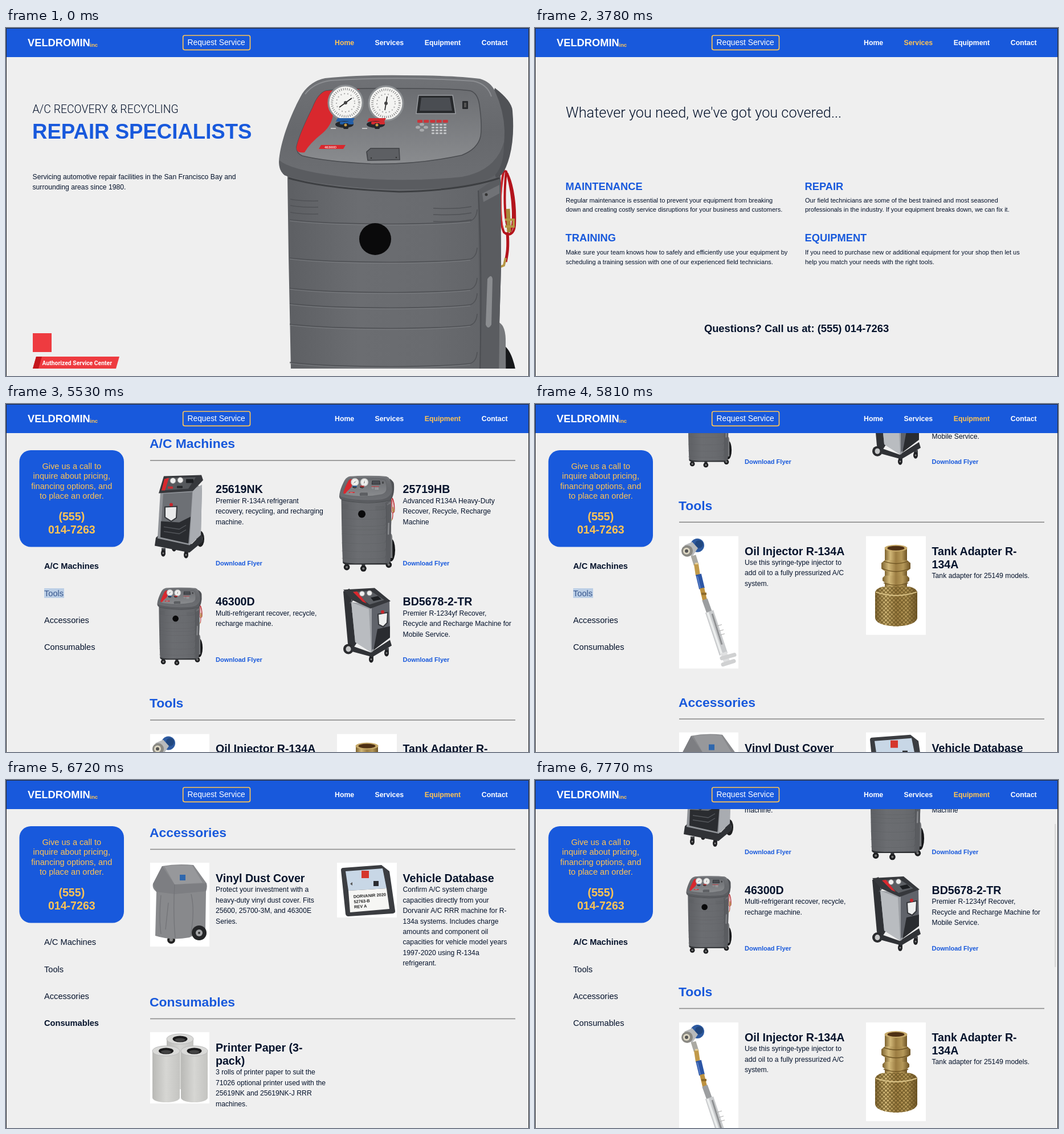
Write an HTML page that moves like this. It is 918 by 610 pixels and loops after 8 s.

```html
<!DOCTYPE html>
<html lang="en">
<head>
<meta charset="utf-8">
<title>Service site tour</title>
<style>
html, body { margin: 0; width: 100%; height: 100%; overflow: hidden; background: #efefef; }
svg { display: block; width: 918px; height: 610px; }
text { font-family: "Liberation Sans", Arial, Helvetica, sans-serif; white-space: pre; }
.b { font-weight: 700; }
.light { font-family: Roboto, "Open Sans", sans-serif; font-weight: 300; }
.tag { font-family: Roboto, Arial, sans-serif; font-weight: 700; }
.mid { text-anchor: middle; }
</style>
</head>
<body>
<svg id="stage" viewBox="0 0 918 610"></svg>
<script>
const BLUE = '#1859dc', GOLD = '#ffc454', INK = '#04122b', BG = '#efefef', PHONE = ['(555)', '014-7263'];

const text = (x, y, size, fill, str, cls = '', more = '') =>
  `<text x="${x}" y="${y}" font-size="${size}" fill="${fill}" class="${cls}" ${more}>${str}</text>`;
const lines = (x, y, step, size, fill, list, cls) =>
  list.map((s, i) => text(x, y + i * step, size, fill, s, cls)).join('');
const path = (d, fill, more = '') => `<path d="${d}" fill="${fill}" ${more}/>`;
const line = (d, color, w = 1, more = '') => path(d, 'none', `stroke="${color}" stroke-width="${w}" ${more}`);
const rect = (x, y, w, h, fill, r = 0, more = '') =>
  `<rect x="${x}" y="${y}" width="${w}" height="${h}" rx="${r}" fill="${fill}" ${more}/>`;
const oval = (x, y, rx, ry, fill, more = '') =>
  `<ellipse cx="${x}" cy="${y}" rx="${rx}" ry="${ry}" fill="${fill}" ${more}/>`;
const dot = (x, y, r, fill, more) => oval(x, y, r, r, fill, more);
const group = (id, body, more = '') => `<g id="${id}" ${more}>${body}</g>`;
const grad = (id, dir, stops) => `<linearGradient id="${id}" ${dir === 'v' ? 'x2="0" y2="1"' : ''}>` +
  stops.map((c, i) => `<stop offset="${i / (stops.length - 1)}" stop-color="${c}"/>`).join('') + '</linearGradient>';

function gauge(x, y, nx, ny) {
  return dot(x, y, 30, '#f4f4f2', 'stroke="#8d9093" stroke-width="3"') +
    dot(x, y, 24, 'none', 'stroke="#777" stroke-width="4" stroke-dasharray="1 2.6"') +
    dot(x, y, 16, 'none', 'stroke="#aaa" stroke-width="2" stroke-dasharray="2 4"') +
    line(`M${x - nx} ${y - ny}L${x + nx} ${y + ny}`, '#222', 1.6) + dot(x, y, 3, '#444');
}

function valve(x, y, color) {
  return path(`M${x - 12} ${y - 11}h30l-3 6h-30z`, color) +
    oval(x, y, 16, 6, '#23272c') + rect(x - 8, y - 5, 24, 5, color, 2) +
    rect(x - 2, y - 2, 9, 10, '#22252a', 2) + dot(x + 2, y + 1, 2.5, '#c59a46') +
    line(`M${x - 24} ${y + 7}h9`, '#ddd', 1.5);
}

function bigUnit() {
  const ridge = [340, 407, 460, 487, 523, 590, 650, 705].map(y =>
    line(`M498 ${y - 4}C570 ${y + 5} 740 ${y + 6} 815 ${y - 2}Q826 ${y - 6} 827 ${y - 22}`, '#505256', 1.6) +
    line(`M498 ${y - 2}C570 ${y + 7} 740 ${y + 8} 815 ${y}`, '#818387', .8)).join('');
  const ribs = [303, 314, 326].map(y =>
    line(`M499 ${y - 3}Q520 ${y + 1} 548 ${y}M750 ${y + 13}Q790 ${y + 15} 817 ${y + 10}`, '#505256', 1.5)).join('');
  let keys = '';
  for (let i = 0; i < 16; i++) keys += rect(747 + i % 4 * 7, 168 + (i >> 2) * 5, 5, 3, '#bfc1c3', 1);
  for (let i = 0; i < 5; i++) keys += rect(722 + i * 11.2, 161, 9, 5, '#c9353a', 1);
  for (const [x, y] of [[723, 174], [737, 174], [730, 169], [730, 179]]) keys += oval(x, y, 4, 2.6, '#a9abad');
  const caster = (x, y) => rect(x - 13, y - 38, 26, 26, '#3a3c3f', 3) +
    dot(x, y, 23, '#1d1e20') + dot(x, y, 9, '#777');
  return caster(535, 768) + caster(660, 778) + caster(850, 750) +
    oval(868, 640, 30, 85, '#17181a') + oval(862, 640, 15, 45, '#66686b') +
    path('M862 515Q876 518 877 545L878 700H860z', '#77797c') +
    // hose and fittings
    line('M874 248C865 290 866 340 874 358C882 365 892 362 893 346C895 300 886 262 876 250M880 255C892 300 893 350 884 358M878 250C873 300 876 340 882 352', '#b3141c', 4) +
    line('M871 252C868 300 869 330 872 352', '#e0393d', 1.3) +
    line('M880 358C882 385 880 395 877 410', '#b3141c', 5) +
    line('M881 317L883 358', '#a8893b', 7) + line('M876 336h15v12h-15M877 403l-3 13l-7 3', '#b59645', 4) +
    // cabinet
    path('M494 258L496 400L500 597L505 735Q508 744 530 747L840 747Q862 740 864 700L866 520L869 420L868 255z', 'url(#front)') +
    path('M828 285L868 258L869 420L866 520L864 700Q862 740 835 747z', '#5a5c60') +
    path('M836 290L866 275L866 290L838 305z', '#707276') +
    path('M845 440Q852 430 854 440L852 520Q846 530 842 520z', '#8b8d90') +
    line('M829 285Q836 420 832 600L828 742', '#4b4d51', 2) + dot(843, 292, 2.5, '#333') + ridge + ribs +
    path('M505 725Q520 738 600 740L840 738L838 749L530 749Q507 746 505 725z', '#2d2f32') +
    // hood
    path('M858 105Q888 128 889 145Q893 190 884 225Q874 262 860 262L835 200z', '#505256') +
    path('M479 235C481 200 500 150 520 115Q535 93 560 88Q620 82 700 83Q790 83 832 89Q850 94 858 110Q874 145 875 180Q875 230 858 258Q842 272 790 279Q690 288 600 278Q520 270 489 258Q479 250 479 235z', 'url(#hood)') +
    path('M480 232Q500 250 600 262Q700 271 800 261Q860 250 874 200Q875 240 858 258Q842 272 790 279Q690 288 600 278Q520 270 489 258Q478 249 480 232z', '#5a5c60') +
    line('M525 116Q540 96 570 92Q690 84 820 93Q845 98 852 120', '#8c8e92', 2) +
    line('M496 263Q560 282 690 287Q800 285 866 263', '#3d3f42', 3) +
    path('M510 208Q515 186 538 140Q548 114 562 110Q600 105 700 106Q790 106 815 110Q828 114 831 135Q836 170 833 190Q828 212 800 223Q720 240 640 238Q560 234 520 224Q509 219 510 208z', 'url(#panel)', 'stroke="#4a4c50" stroke-width="1.5"') +
    path('M510 208Q515 186 538 140Q548 114 562 110L622 107Q582 118 574 148Q574 168 556 184Q533 202 524 218Q508 220 510 208z', '#d9282e') +
    gauge(596, 131, -11, 8) + gauge(667, 132, -2, 12) +
    valve(594, 169, '#245fa8') + valve(649, 169, '#d22b30') +
    path('M724 118H784L789 150H720z', '#27292c', 'stroke="#999ca0" stroke-width="1.5"') +
    path('M729 122H779L783 145H726z', '#4a4d52') + rect(801, 128, 10, 14, '#292b2e', 1) + rect(804, 131, 4, 8, '#555') +
    keys + path('M553 205H596L592 212H549z', '#d9282e') +
    text(559, 211, 6, '#f4dada', '46300D', 'b') +
    path('M640 211H690L691 231L635 232L633 217z', '#5d5f63', 'stroke="#3c3e42" stroke-width="1.5"') +
    dot(641, 228, 1.2, '#333') + dot(685, 227, 1.2, '#333') +
    dot(648, 370, 28, '#0a0a0b');
}

const casterS = (x, y) => rect(x - 3, y - 9, 7, 7, '#44464a') + oval(x, y, 4, 6, '#202124') + dot(x, y, 1.5, '#888');

function tallUnit() {
  return oval(341, 237, 7, 14, '#1f2022') + oval(342, 237, 3, 6, '#8d8f92') + casterS(276, 262) + casterS(316, 265) + casterS(295, 253) +
    path('M263 235L270 228L326 246L344 228L345 242L322 261L261 249z', '#303236') +
    path('M271 154L334 141L344 148L342 230L322 248L266 236z', '#8f9297') +
    path('M328 150L344 142L342 230L322 248z', '#a9acb1') +
    path('M276 158L327 155L321 244L271 233z', '#6d7075') +
    path('M272 206L304 208L324 198L320 245L271 234z', '#2a2c30') +
    line('M277 216L304 220L316 213M277 224L304 228L316 221', '#55585d', 1.3) +
    path('M279 181L300 180L299 200L290 206L279 199z', '#e9eaeb', 'stroke="#34363a" stroke-width="2"') +
    path('M277 127L343 125L346 134L328 153L268 157z', '#36383c') +
    path('M282 130L333 129L320 149L273 152z', '#55585c') +
    path('M278 132L286 130L279 152L273 152z', '#d9282e') +
    dot(293, 135, 5, '#eee', 'stroke="#888"') + dot(306, 134, 5, '#eee', 'stroke="#888"') +
    rect(316, 132, 13, 7, '#1d1f22', 1) + rect(284, 145, 9, 4, '#c72d32', 1) + rect(300, 144, 10, 4, '#26282b', 1) +
    dot(290, 177, 3, '#c8252b');
}

function mobileUnit() {
  return path('M592 329L603 324L619 414L606 434L600 420z', '#303236') +
    line('M604 350L612 340M607 366L614 358M610 383L617 375', '#55585d', 2) +
    dot(601, 430, 9, '#2a2b2e') + oval(601, 430, 4.5, 5, '#c7c8c9') + casterS(641, 448) + casterS(668, 437) +
    path('M606 424L640 436L674 414L677 424L643 444L606 434z', '#303236') +
    path('M606 348L650 352L672 344L674 402L642 436L613 418z', '#9da0a5') +
    path('M606 348L637 360L641 436L613 418z', '#b9bcc0') +
    path('M642 354L673 344L674 402L656 420L642 432z', '#60636a') +
    path('M652 395L674 390L674 410L645 432z', '#2a2c30') +
    path('M653 369L670 366L669 384L662 391L654 387z', '#eeefef', 'stroke="#34363a" stroke-width="2"') +
    path('M592 326L647 323L675 346L640 359L607 344z', '#36383c') +
    path('M609 330L640 328L664 344L638 352z', '#5b5e63') +
    path('M609 330L616 329L633 350L626 347z', '#d9282e') +
    dot(625, 333, 4.5, '#eee', 'stroke="#888"') + dot(638, 332, 4.5, '#eee', 'stroke="#888"') +
    path('M640 340L653 337L659 343L645 346z', '#1d1f22') + dot(661, 365, 3, '#c8252b');
}

function injector() {
  return rect(253, 136, 104, 232, '#fff') + dot(285, 152, 12, '#2d5aa0') + dot(288, 150, 7, '#21477f') +
    path('M262 152L276 146L286 157L275 173z', '#b8babb') + dot(267, 162, 10, '#8a8983') + dot(266, 162, 6, '#ded8c4') + dot(266, 162, 3, '#555') +
    line('M278 170L283 186', '#aaa9a2', 9) + line('M283 185L286 205', '#c19a4a', 8) + line('M281 184L286 184', '#e8d19a', 3) +
    line('M287 203L293 228', '#2c56a6', 10) + line('M285 206L290 227', '#5b80c8', 2) +
    line('M293 227L298 248', '#bd923f', 8) + line('M292 237h9', '#8d6a2a', 4) +
    line('M298 247L307 272', '#9c9ea0', 10) + line('M306 268L331 343', '#c9cbcd', 15) +
    line('M303 270L328 344', '#eceeee', 4) + line('M311 272L328 326', '#8f9193', 3) +
    line('M321 303l10 -3M323 310l10 -3M318 294l10 -3', '#aaa', 1) +
    line('M331 340L337 357', '#dfe0e1', 11) + line('M328 350L350 344M330 361L349 355', '#d0d1d2', 7, 'stroke-linecap="round"');
}

function adapter() {
  return rect(581, 136, 105, 173, '#fff') +
    rect(614, 156, 39, 76, 'url(#brass)') + path('M614 178L608 183V193L614 197H653L659 193V183L653 178z', 'url(#brass)') +
    path('M614 205L610 209V214L615 218H652L657 214V209L653 205z', 'url(#brass)') +
    line('M610 193Q634 203 657 193M612 180Q634 188 655 180M612 218Q634 226 655 218', '#6f5523', 1.5) +
    oval(633.5, 157, 20, 6, '#c7aa6a') + oval(633.5, 157, 15, 4, '#4e3014') +
    path('M597 234Q600 225 616 224H652Q668 225 671 234V280Q666 293 634 294Q601 293 597 280z', 'url(#brass)') +
    path('M597 234Q600 225 616 224H652Q668 225 671 234V280Q666 293 634 294Q601 293 597 280z', 'url(#knurl)') +
    line('M598 234Q634 246 670 234', '#d9c286', 2);
}

function cover() {
  return rect(253, 145, 104, 147, '#fff') + dot(290, 280, 7, '#222') + dot(290, 280, 3, '#888') +
    path('M274 151Q300 146 329 149L352 181Q354 188 351 195L350 262L322 276Q290 282 262 273L264 196Q256 190 258 182z', '#88898c') +
    path('M274 151L296 183L352 181L351 195L296 200L264 196L258 182z', '#7d7e82') +
    path('M278 151Q300 148 327 150L345 180L296 183z', '#97989b') +
    line('M296 183Q293 230 297 277M272 202Q268 240 272 270M325 200Q332 230 324 272M285 215L280 262', '#737478', 1.3) +
    dot(339, 268, 13, '#252628') + dot(339, 268, 6, '#a4a5a7') + dot(339, 268, 2, '#333') + rect(305, 166, 10, 10, '#2f67ad');
}

function card() {
  return rect(581, 145, 105, 96, '#fff') +
    path('M588 158Q588 154 592 154L659 149L673 160L683 229Q684 233 679 234L601 239Q597 239 596 235z', '#3b3d41') +
    path('M596 160L661 155L668 190L601 194z', '#c8d7e6') + path('M601 194L668 190L673 226L604 232z', '#f6f6f4') +
    rect(624, 159, 13, 13, '#d5372c') + rect(645, 177, 9, 9, '#2b2c30') + path('M604 182l4 -3v6z', '#555') +
    `<g transform="rotate(-4 640 206)">` + lines(610, 205, 9, 7.4, '#222', ['DORVANIR 2020', '52763-B', 'REV A'], 'b') + '</g>';
}

function rolls() {
  const roll = (x, y, w, h) => path(`M${x} ${y}V${y + h}A${w / 2} 8 0 0 0 ${x + w} ${y + h}V${y}z`, 'url(#paper)') +
    oval(x + w / 2, y, w / 2, 9, '#d9d9d7', 'stroke="#bbb"') + oval(x + w / 2, y, 13, 5.5, '#1b1b1c') + oval(x + w / 2, y + 1.5, 9, 3, '#444');
  return rect(253, 442, 104, 125, '#fff') + roll(282, 454, 47, 80) + roll(257, 475, 48, 82) + roll(307, 475, 47, 82);
}

function item(x, y, title, desc, linkY) {
  return lines(x, y, 23, 19.6, INK, title, 'b') +
    lines(x, y + 17.3 + (title.length - 1) * 23, 18.4, 12.2, INK, desc) +
    (linkY ? text(x, linkY, 11, BLUE, 'Download Flyer', 'b') : '');
}
const section = (y, name) => text(252, y, 22.9, BLUE, name, 'b') + rect(253, y + 20.7, 641, 1.6, '#8b8b8b');
const shift = (y, body) => `<g transform="translate(0 ${y})">${body}</g>`;

const defs = `<defs>${grad('front', 'h', ['#5d5f63', '#6b6d71', '#696b6f', '#606266'])}
${grad('hood', 'v', ['#707276', '#66686c', '#6e7074'])}${grad('panel', 'v', ['#6b6d71', '#8a8c8f'])}
${grad('brass', 'h', ['#7c6230', '#d2b878', '#9c7d42', '#b59858', '#6e5426'])}${grad('paper', 'h', ['#b9b9b6', '#d6d6d3', '#c4c4c1'])}
<pattern id="knurl" width="7" height="7" patternUnits="userSpaceOnUse">${line('M0 0L7 7M7 0L0 7', '#65501f', 1.1)}</pattern>
<clipPath id="cut"><rect x="470" y="60" width="440" height="537"/></clipPath>${group('unit', bigUnit())}</defs>`;

const home =
  text(46.5, 149, 19.4, INK, 'A/C RECOVERY &amp; RECYCLING', 'light') +
  text(46, 194, 36.6, BLUE, 'REPAIR SPECIALISTS', 'b') +
  lines(46.5, 265, 18.4, 12.2, INK, ['Servicing automotive repair facilities in the San Francisco Bay and', 'surrounding areas since 1980.']) +
  rect(47, 535, 33, 33, '#ee3b40') +
  path('M53 576H199L193 597H47z', '#ee3b40') + path('M53 576H63L57 597H47z', '#c4161c') +
  text(63.5, 591, 10.4, '#fff', 'Authorized Service Center', 'tag') +
  '<g clip-path="url(#cut)"><use href="#unit"/></g>';

const offer = (x, y, gap, name, body) => text(x - .4, y, 18.3, BLUE, name, 'b') + lines(x, y + (gap > 16 ? 23 : 22), gap, 11, INK, body);
const services =
  text(54, 156.5, 25.3, INK, "Whatever you need, we've got you covered...", 'light') +
  offer(54, 284, 16, 'MAINTENANCE', ['Regular maintenance is essential to prevent your equipment from breaking', 'down and creating costly service disruptions for your business and customers.']) +
  offer(474, 284, 16, 'REPAIR', ['Our field technicians are some of the best trained and most seasoned', 'professionals in the industry. If your equipment breaks down, we can fix it.']) +
  offer(54, 374, 17, 'TRAINING', ['Make sure your team knows how to safely and efficiently use your equipment by', 'scheduling a training session with one of our experienced field technicians.']) +
  offer(474, 374, 17, 'EQUIPMENT', ['If you need to purchase new or additional equipment for your shop then let us', 'help you match your needs with the right tools.']) +
  text(459, 532.5, 18.35, INK, 'Questions? Call us at: ' + PHONE.join(' '), 'b mid');

const catalog =
  section(100, 'A/C Machines') +
  shift(22, tallUnit() + mobileUnit() +
    '<use href="#unit" transform="translate(585 126) scale(.234) translate(-479 -82)"/>' +
    '<use href="#unit" transform="translate(265.5 322) scale(.19) translate(-479 -82)"/>' +
    item(368, 157, ['25619NK'], ['Premier R-134A refrigerant', 'recovery, recycling, and recharging', 'machine.'], 284) +
    item(696.5, 157, ['25719HB'], ['Advanced R134A Heavy-Duty', 'Recover, Recycle, Recharge', 'Machine'], 284) +
    item(368, 354, ['46300D'], ['Multi-refrigerant recover, recycle,', 'recharge machine.'], 452.5) +
    item(696.5, 354, ['BD5678-2-TR'], ['Premier R-1234yf Recover,', 'Recycle and Recharge Machine for', 'Mobile Service.'], 452.5)) +
  section(555, 'Tools') +
  shift(465, injector() + adapter() +
    item(368, 169, ['Oil Injector R-134A'], ['Use this syringe-type injector to', 'add oil to a fully pressurized A/C', 'system.']) +
    item(696.5, 169, ['Tank Adapter R-', '134A'], ['Tank adapter for 25149 models.'])) +
  section(900, 'Accessories') + section(1197, 'Consumables') +
  shift(800, cover() + card() + rolls() +
    item(368, 179, ['Vinyl Dust Cover'], ['Protect your investment with a', 'heavy-duty vinyl dust cover. Fits', '25600, 25700-3M, and 46300E', 'Series.']) +
    item(696.5, 179, ['Vehicle Database'], ['Confirm A/C system charge', 'capacities directly from your', 'Dorvanir A/C RRR machine for R-', '134a systems. Includes charge', 'amounts and component oil', 'capacities for vehicle model years', '1997-2020 using R-134a', 'refrigerant.']) +
    item(368, 476, ['Printer Paper (3-', 'pack)'], ['3 rolls of printer paper to suit the', '71026 optional printer used with the', '25619NK and 25619NK-J RRR', 'machines.']));

const menu = ['A/C Machines', 'Tools', 'Accessories', 'Consumables'];
const side = rect(23.5, 81, 183.5, 169.5, BLUE, 20) +
  lines(115.3, 114, 17.4, 14.6, GOLD, ['Give us a call to', 'inquire about pricing,', 'financing options, and', 'to place an order.'], 'mid') +
  lines(115.3, 204, 22.8, 19.6, GOLD, PHONE, 'b mid') +
  group('menu', rect(0, 323, 35, 17, '#bccfe6', 0, 'id="mark"') +
    menu.map((s, i) => text(0, 289.3 + i * 47.3, 14.65, INK, s, '', `id="m${i}"`)).join(''));

const header = rect(0, 0, 918, 51, BLUE) +
  text(38, 32.3, 18.3, '#fff', 'VELDROMIN', 'b') + text(147.3, 32.5, 9.6, GOLD, 'inc', 'b') +
  rect(310.7, 13, 117.8, 25.3, 'none', 3, `stroke="${GOLD}" stroke-width="1.7"`) +
  text(318.5, 30.3, 13.8, '#fff', 'Request Service') +
  [['Home', 577], ['Services', 647.5], ['Equipment', 734.7], ['Contact', 834.8]]
    .map(([s, x], i) => text(x, 30.3, 12.3, '#fff', s, 'b', `id="n${i}"`)).join('');

document.getElementById('stage').innerHTML = defs + rect(0, 0, 918, 610, BG) +
  group('home', home) + group('services', services) +
  group('equipment', group('catalog', catalog) + side + rect(912, 77, 2.5, 251, '#d9d9d9', 1, 'id="bar"')) +
  header + line('M.5 610V.5H917.5V610', '#26282c', 1);

const $ = id => document.getElementById(id);
const clamp = v => Math.min(1, Math.max(0, v));
const show = (id, on) => $(id).setAttribute('display', on ? 'inline' : 'none');
const tint = k => `rgb(255,${Math.round(255 - 59 * k)},${Math.round(255 - 171 * k)})`;

const LOOP = 8000, STEP = 70;
const scrolls = [[5460, 5950, 0, 455], [6327, 6720, 455, 800], [7280, 7770, 800, 176]];

function scrollAt(t) {
  let s = 0;
  for (const [a, b, from, to] of scrolls)
    if (t >= a) s = from + (to - from) * (1 - Math.cos(Math.PI * clamp((t - a) / (b - a)))) / 2;
  return s;
}

function draw(t) {
  const page = t < 2520 ? 0 : t < 4200 ? 1 : 2;
  ['home', 'services', 'equipment'].forEach((id, i) => show(id, i === page));
  const hover = [0, clamp((t - 2240) / 70), clamp((t - 3780) / 280)];
  for (let i = 0; i < 3; i++) $('n' + i).setAttribute('fill', tint(i === page ? 1 : i > page ? hover[i] : 0));

  const s = scrollAt(t);
  $('catalog').setAttribute('transform', `translate(0 ${-s})`);
  show('bar', t >= 7350);
  $('bar').setAttribute('y', 77 + (s - 176) * .411);

  const active = s < 380 ? 0 : s < 720 ? 1 : s < 795 ? 2 : 3;
  const picked = t >= 5530 && t < 5880 ? 1 : t >= 6300 && t < 6650 ? 2 : -1;
  $('menu').setAttribute('transform', `translate(${active % 3 ? 69.5 : 67} 0)`);
  menu.forEach((_, i) => {
    $('m' + i).setAttribute('class', i === active ? 'b' : '');
    $('m' + i).setAttribute('fill', i === picked ? '#36558c' : INK);
  });
  show('mark', picked > 0);
  $('mark').setAttribute('y', picked === 2 ? 370 : 323);
  $('mark').setAttribute('width', picked === 2 ? 79.5 : 35);
}

const start = performance.now();
let last = -1;
function tick(now) {
  const t = Math.floor(Math.max(0, now - start) % LOOP / STEP) * STEP;
  if (t !== last) draw(last = t);
  requestAnimationFrame(tick);
}
draw(0);
requestAnimationFrame(tick);
</script>
</body>
</html>
```
